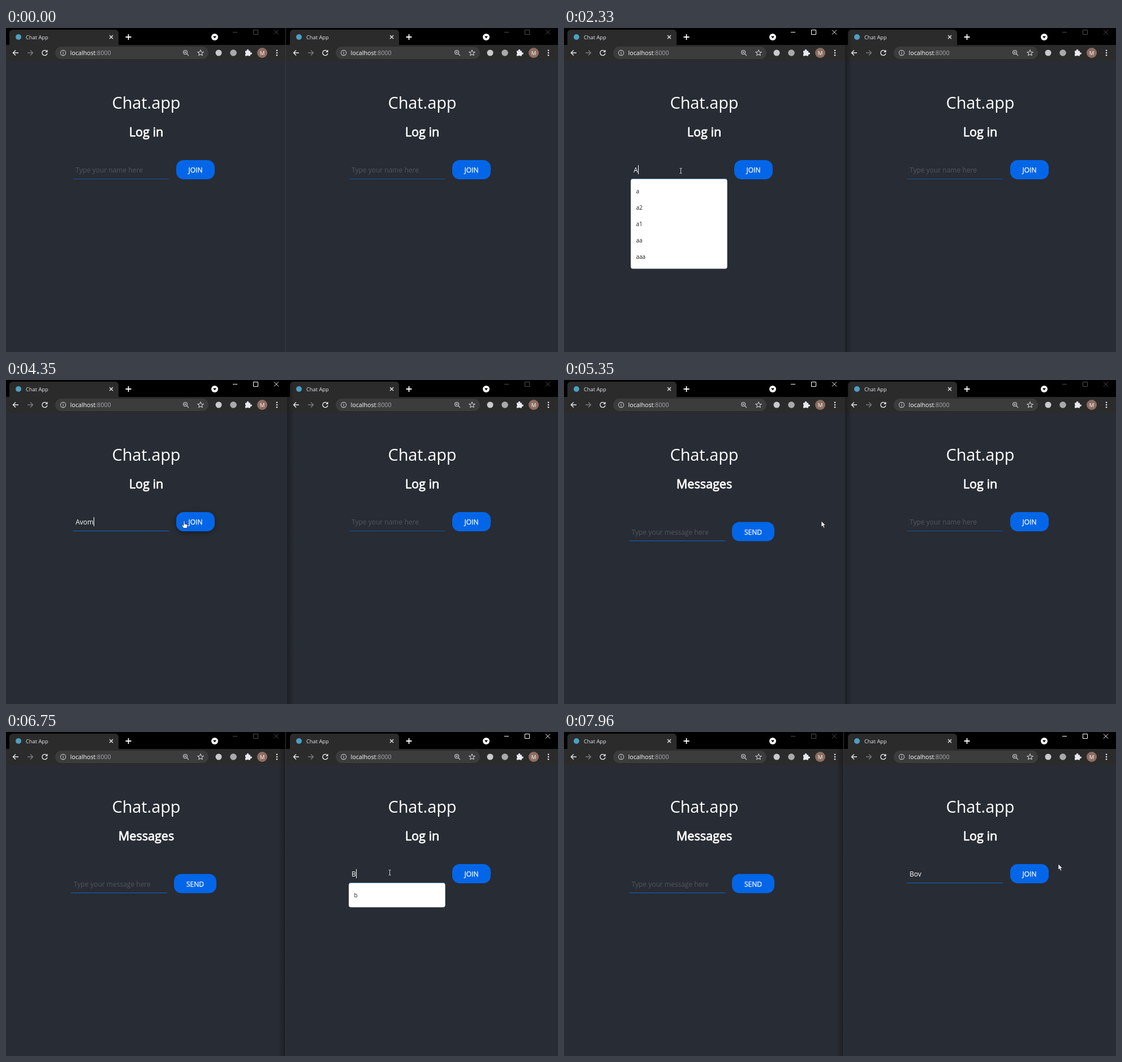
Write an HTML page with a canvas that moves like this. It is 976 px wide and 574 px high and loops after 8000 ms.

```html
<!DOCTYPE html>
<html lang="en">
<head>
<meta charset="utf-8">
<title>Chat App</title>
<style>
  html, body { margin: 0; width: 976px; height: 574px; overflow: hidden; background: #282c34; }
  canvas { display: block; }
</style>
</head>
<body>
<canvas id="stage" width="976" height="574"></canvas>
<script>
const ctx = document.getElementById('stage').getContext('2d');
const LOOP = 8000, PAGE_X = 488;
const LEFT_FOCUS = 1390, JOINED = 5050, RIGHT_FOCUS = 6010;
const FONT = '"Open Sans", "Noto Sans", sans-serif';

const users = [
  { x: 0, focus: LEFT_FOCUS, blink: 1340, blur: JOINED, fade: 2790,
    typed: [[2330, 'A'], [2790, 'Av'], [2935, 'Avo'], [3060, 'Avom']],
    matches: ['a', 'a2', 'a1', 'aa', 'aaa'] },
  { x: PAGE_X, focus: RIGHT_FOCUS, blink: 6020, blur: LOOP, fade: 6995,
    typed: [[6750, 'B'], [6950, 'Bo'], [7220, 'Bov']],
    matches: ['b'] }
];
const history = ['a', 'b', 'a2', 'a1', 'c', 'ww'];

// pointer: time, x, y
const path = [
  [290, 762, 572], [990, 204, 252], [1100, 204, 252], [1130, 203, 251],
  [1290, 203, 251], [1320, 201.5, 251], [1520, 201.5, 251], [1600, 205.5, 252.5],
  [3850, 205.5, 252.5], [4350, 315, 250], [5150, 315, 250], [5620, 673, 250],
  [5750, 677.5, 248.5], [7650, 677.5, 248.5], [7890, 882, 221], [7960, 874, 234]
];
// click marks: start, end, x, y
const clicks = [[1320, 1600, 201.5, 251], [4870, 5110, 315, 251], [5950, 6330, 677.5, 248]];

function text(str, x, y, size, color, align = 'left', stroke = 0) {
  ctx.font = `${size}px ${FONT}`;
  ctx.textAlign = align;
  ctx.fillStyle = ctx.strokeStyle = color;
  ctx.fillText(str, x, y);
  if (stroke) {
    ctx.lineWidth = stroke;
    ctx.lineJoin = 'round';
    ctx.strokeText(str, x, y);
  }
  return ctx.measureText(str).width;
}

function box(x, y, w, h, color, r = 0) {
  ctx.fillStyle = color;
  ctx.beginPath();
  ctx.roundRect(x, y, w, h, r);
  ctx.fill();
}

function dot(x, y, r, color) {
  ctx.fillStyle = color;
  ctx.beginPath();
  ctx.arc(x, y, r, 0, 7);
  ctx.fill();
}

function line(d, color, x = 0, y = 0, width = 1.4, fill) {
  ctx.save();
  ctx.translate(x, y);
  const p = new Path2D(d);
  ctx.lineJoin = 'miter';
  if (fill) { ctx.fillStyle = fill; ctx.fill(p); }
  if (color) { ctx.strokeStyle = color; ctx.lineWidth = width; ctx.stroke(p); }
  ctx.restore();
}

// lx shifts the left-hand controls, rx the right-hand ones
function browser(x, w, lx, rx, active) {
  const ink = '#e8eaed';
  box(x, 0, w, 30, '#000');
  box(x, 30, w, 29, '#2b2b2c');
  box(lx + 6, 3, 193, 28, '#2b2b2c', [6, 6, 0, 0]);
  dot(lx + 22, 16, 5, '#4c9fc0');
  text('Chat App', lx + 35, 19.5, 9.3, ink);
  line('M-3-3L3 3M3-3L-3 3', ink, lx + 186, 16);
  line('M-5 0H5M0-5V5', '#fff', lx + 216.5, 16, 1.8);
  dot(rx + 369, 16, 6, '#fff');
  line('M-3-1.5H3L0 2.5Z', null, rx + 369, 16, 0, '#000');

  const controls = active ? '#fff' : '#4e4e4e';
  line('M401 7.5H409M437.5 3.5h8v8h-8ZM474 3.5L482 11.5M482 3.5L474 11.5', controls, rx, 0, 1);

  line('M5 0H-4.5M0-4.5L-4.5 0L0 4.5', ink, lx + 17, 44);
  line('M-5 0H4.5M0-4.5L4.5 0L0 4.5', '#77797b', lx + 43, 44);
  line('M3.3-3.2A4.6 4.6 0 1 0 4.5 1', ink, lx + 68.5, 44);
  line('M5-5.5V-1H.5Z', null, lx + 68.5, 44, 0, ink);

  box(lx + 87, 33, 271 + rx - lx, 22, '#3c3c3d', 11);
  line('M4.6 0A4.6 4.6 0 1 1-4.6 0A4.6 4.6 0 1 1 4.6 0M0-.8V2.6M0-2.7V-1.5', '#c4c7ca', lx + 101, 44, 1.1);
  const host = text('localhost', lx + 113.5, 48, 10.7, '#fff');
  text(':8000', lx + 113.5 + host, 48, 10.7, '#a5a8ab');
  line('M2.5-1A3.5 3.5 0 1 1-4.5-1A3.5 3.5 0 1 1 2.5-1M1.6 1.6L5 5M-2.7-1H.7M-1-2.7V.7', '#c4c7ca', rx + 318, 44, 1.2);
  line('M0-5L1.5-1.7L5-1.3L2.4 1L3.2 4.5L0 2.7L-3.2 4.5L-2.4 1L-5-1.3L-1.5-1.7Z', '#c4c7ca', rx + 344, 44, 1.1);
  dot(rx + 376, 44, 5.5, '#c9cacb');
  dot(rx + 402, 44, 5.8, '#a9aaab');
  line('M-5-3H-2.2A1.9 1.9 0 1 1 1.2-3H4V0A1.9 1.9 0 1 1 4 3.2V6H1A1.8 1.8 0 0 0-2 6H-5V3A1.8 1.8 0 0 0-5 0Z', null, rx + 428, 43.5, 0, ink);
  dot(rx + 453, 44, 9, '#8d6e63');
  text('M', rx + 453, 47.5, 9.5, '#fff', 'center');
  for (const y of [39.7, 44, 48.3]) dot(rx + 479, y, 1.3, ink);
}

function form(hint, value, label, x, y, w, bx, bw, focused, hover) {
  const drawn = text(value || hint, x + 4.5, y + 22, 12, value ? '#fff' : '#53565b');
  box(x, y + 33, w, 1, focused ? '#1268cc' : '#17549e');
  ctx.save();
  if (hover) {
    ctx.shadowColor = 'rgba(0,0,0,.4)';
    ctx.shadowBlur = 10;
    ctx.shadowOffsetY = 2;
  }
  box(bx, y, bw, 34, '#0366e8', 13);
  ctx.restore();
  text(label, bx + bw / 2, y + 22, 12, '#fff', 'center', .25);
  return x + 4.5 + (value ? drawn : 0);
}

function dropdown(x, items, gone) {
  const h = items.length * 29 + 14, scale = 1 - .05 * gone;
  ctx.save();
  ctx.globalAlpha = 1 - gone;
  ctx.translate(x + 203.3, 267.5 + h / 2);
  ctx.scale(scale, scale);
  ctx.translate(-85.3, -h / 2);
  box(0, 0, 170.6, h, '#fff', 4);
  items.forEach((item, i) => text(item, 9.5, 25 + i * 29, 10, '#1c1c1c'));
  ctx.restore();
}

function page(user, t, pointer) {
  const { x } = user, mid = x + 248;
  const joined = x === 0 && t >= JOINED;
  text('Chat.app', mid, 142.5, 28.8, '#fff', 'center');
  text(joined ? 'Messages' : 'Log in', mid, 192, 21.6, '#fff', 'center', .8);
  if (joined) {
    form('Type your message here', '', 'SEND', 115, 251.5, 170, 297, 75, true, false);
    return;
  }
  const last = user.typed.filter(([at]) => t >= at).pop();
  const focused = t >= user.focus && t < user.blur;
  const end = form('Type your name here', last ? last[1] : '', 'JOIN',
    x + 118.5, 234, 169.5, x + 301, 68, focused, over(pointer, x + 301, x + 369));
  if (!focused) return;
  const since = Math.max(0, t - (last ? last[0] : user.blink));
  if (since % 1060 < 530) box(Math.round(end), 243, 1, 16, '#fff');
  const gone = Math.min(1, Math.max(0, (t - user.fade) / 180));
  if (gone < 1) dropdown(x, last ? user.matches : history, gone);
}

const over = (p, left, right) => !!p && p.x >= left && p.x <= right && p.y >= 234 && p.y <= 268;

function pointerAt(t) {
  if (t < 310) return null;
  const i = path.findIndex(([at]) => at > t);
  if (i < 0) return { x: path.at(-1)[1], y: path.at(-1)[2] };
  const [t0, x0, y0] = path[i - 1], [t1, x1, y1] = path[i];
  const k = (t - t0) / (t1 - t0), e = k * k * (3 - 2 * k);
  return { x: x0 + (x1 - x0) * e, y: y0 + (y1 - y0) * e };
}

function drawPointer(p, t) {
  for (const [from, to, x, y] of clicks)
    if (t >= from && t < to) dot(x, y, 9.5, 'rgba(255,240,0,.5)');
  const joined = t >= JOINED;
  const onInput = !joined && over(p, 118, 288) || over(p, 606, 776);
  const onButton = !joined && over(p, 301, 369) || over(p, 789, 857);
  const x = Math.round(p.x), y = Math.round(p.y);
  if (onInput) line('M-2-4.5H-.5L0-4L.5-4.5H2M0-4V4M-2 4.5H-.5L0 4L.5 4.5H2', '#d4d4d4', x + .5, y, 1);
  else if (onButton) line('M-1 0Q0-1.2 1 0V5L5 6Q6 6.3 6 7.5L5 12.5H-1L-4 8Q-4.5 6.5-3 6.5L-1 8Z', '#222', x, y, .7, '#fff');
  else line('M0 0V10L2.3 8L4 12L5.8 11.2L4.1 7.3H7.3Z', '#111', x, y, .6, '#fff');
}

function shade(from, to) {
  const g = ctx.createLinearGradient(from, 0, to, 0);
  g.addColorStop(0, 'rgba(0,0,0,.3)');
  g.addColorStop(1, 'rgba(0,0,0,0)');
  ctx.fillStyle = g;
  ctx.fillRect(Math.min(from, to), 0, Math.abs(to - from), 574);
}

function draw(t) {
  const leftActive = t >= LEFT_FOCUS && t < RIGHT_FOCUS - 60;
  const rightActive = t >= RIGHT_FOCUS - 60;
  const pointer = pointerAt(t);
  box(0, 0, 976, 574, '#282c34');
  browser(0, 496, 0, 0, leftActive);
  browser(496, 480, 496, 480, rightActive);
  if (leftActive) shade(497, 510);
  else {
    if (rightActive) shade(494, 482);
    box(494, 0, 1, 574, '#35383e');
  }
  for (const user of users) page(user, t, pointer);
  if (pointer) drawPointer(pointer, t);
}

const start = performance.now();
function tick() {
  draw((performance.now() - start) % LOOP);
  requestAnimationFrame(tick);
}
tick();
</script>
</body>
</html>
```
